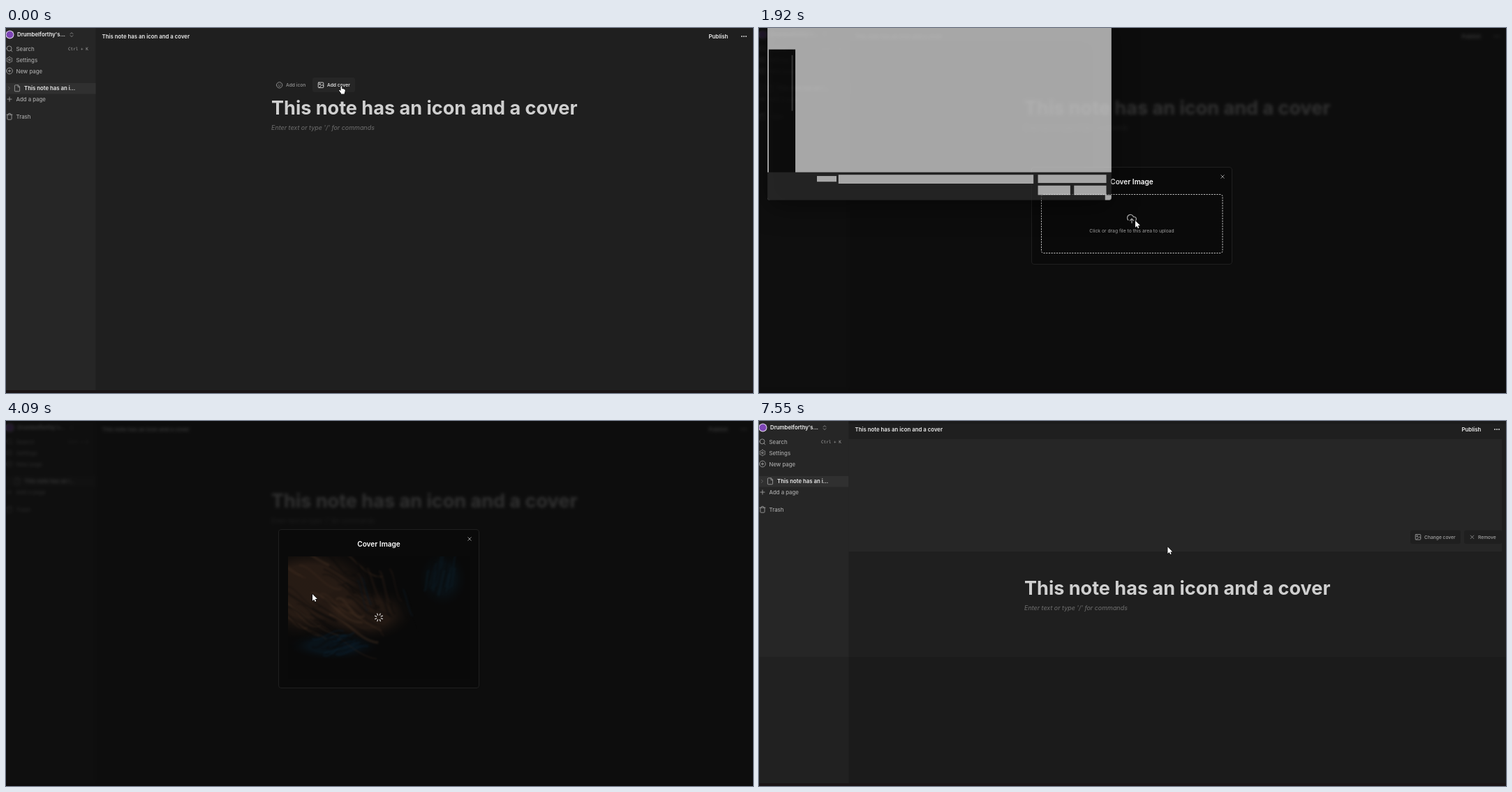
Animation, 1070 px wide and 523 px high, one loop 8 s. Source, as an HTML page with a canvas:

```html
<!DOCTYPE html>
<html lang="en">
<head>
<meta charset="utf-8">
<title>Note cover upload</title>
<style>
html, body { margin: 0; width: 100%; height: 100%; overflow: hidden; background: #1f1f1f; }
canvas { display: block; }
</style>
</head>
<body>
<canvas id="stage" width="1070" height="523"></canvas>
<script>
const W = 1070, H = 523, LOOP = 8000, PAD = 40;
const stage = document.getElementById('stage').getContext('2d');
let c = stage;

const UI = 'Inter, sans-serif', SYS = '"Open Sans", "Noto Sans", sans-serif';
const grey = v => `rgb(${v},${v},${v})`;
const clamp = v => Math.min(1, Math.max(0, v));
const span = (t, a, b) => clamp((t - a) / (b - a));
const easeOut = p => 1 - (1 - p) ** 2;
const smooth = p => p * p * (3 - 2 * p);

// ---------- drawing helpers ----------
function box(x, y, w, h, fill, r = 0, line) {
  c.beginPath();
  c.roundRect(x, y, w, h, r);
  if (fill) { c.fillStyle = fill; c.fill(); }
  if (line) { c.strokeStyle = line; c.lineWidth = 1; c.stroke(); }
}

function disc(x, y, r, fill) {
  c.beginPath();
  c.arc(x, y, r, 0, 7);
  c.fillStyle = fill;
  c.fill();
}

function text(s, x, y, font, fill, align = 'left') {
  c.font = font;
  c.fillStyle = fill;
  c.textAlign = align;
  c.fillText(s, x, y);
}

const sys = (s, x, y, align, fill = '#f2f2f2') => text(s, x, y, '6.5px ' + SYS, fill, align);

const ICONS = {
  search: 'M3 11a8 8 0 1 0 16 0a8 8 0 1 0-16 0M21 21l-4.3-4.3',
  plusRing: 'M2 12a10 10 0 1 0 20 0a10 10 0 1 0-20 0M8 12h8M12 8v8',
  plus: 'M5 12h14M12 5v14',
  updown: 'M7 15l5 5 5-5M7 9l5-5 5 5',
  right: 'M9 18l6-6-6-6',
  down: 'M6 9l6 6 6-6',
  file: 'M14.5 2H6a2 2 0 0 0-2 2v16a2 2 0 0 0 2 2h12a2 2 0 0 0 2-2V7.5zM14.5 2v6H20',
  trash: 'M3 6h18M19 6v14c0 1-1 2-2 2H7c-1 0-2-1-2-2V6M8 6V4c0-1 1-2 2-2h4c1 0 2 1 2 2v2',
  smile: 'M2 12a10 10 0 1 0 20 0a10 10 0 1 0-20 0M8 14s1.5 2 4 2 4-2 4-2M9 9h.1M15 9h.1',
  image: 'M5 3h14a2 2 0 0 1 2 2v14a2 2 0 0 1-2 2H5a2 2 0 0 1-2-2V5a2 2 0 0 1 2-2z' +
    'M7 9a2 2 0 1 0 4 0a2 2 0 1 0-4 0M21 15l-3.1-3.1a2 2 0 0 0-2.8 0L6 21',
  cross: 'M18 6L6 18M6 6l12 12',
  cloud: 'M4 14.9A7 7 0 1 1 15.7 8h1.8a4.5 4.5 0 0 1 2.5 8.2M12 12v9M16 16l-4-4-4 4',
  loader: 'M12 2v4M12 18v4M4.9 4.9l2.9 2.9M16.2 16.2l2.9 2.9M2 12h4M18 12h4M4.9 19.1l2.9-2.9M16.2 7.8l2.9-2.9',
  gear: gearPath()
};

function gearPath() {
  let d = 'M9 12a3 3 0 1 0 6 0a3 3 0 1 0-6 0';
  for (let i = 0; i <= 48; i++) {
    const a = i * Math.PI / 24, r = 8.7 + 1.2 * Math.cos(6 * a);
    d += (i ? 'L' : 'M') + (12 + r * Math.sin(a)).toFixed(2) + ' ' + (12 - r * Math.cos(a)).toFixed(2);
  }
  return d;
}

function icon(name, x, y, size, color, turn = 0) {
  c.save();
  c.translate(x, y);
  c.rotate(turn);
  c.scale(size / 24, size / 24);
  c.translate(-12, -12);
  c.strokeStyle = color;
  c.lineWidth = 2;
  c.lineCap = c.lineJoin = 'round';
  c.stroke(new Path2D(ICONS[name]));
  c.restore();
}

// Paints once into a padded bitmap and keeps it.
const cache = {};
function layer(key, paint) {
  if (!cache[key]) {
    const cv = document.createElement('canvas'), outer = c;
    cv.width = W + 2 * PAD;
    cv.height = H + 2 * PAD;
    c = cv.getContext('2d');
    c.translate(PAD, PAD);
    paint();
    c = outer;
    cache[key] = cv;
  }
  return cache[key];
}

function put(bitmap, alpha = 1, scale = 1, cx = 0, cy = 0) {
  c.save();
  c.globalAlpha = alpha;
  c.translate(cx, cy);
  c.scale(scale, scale);
  c.drawImage(bitmap, -PAD - cx, -PAD - cy);
  c.restore();
}

// ---------- note page ----------
const SMALL = '500 6.7px ' + UI, BODY = '500 7.8px ' + UI, STRONG = '600 7.8px ' + UI;
const NOTE = 'This note has an icon and a cover';

function sideRow(name, label, y, x = 14.5) {
  icon(name, 5, y, 10.5, grey(160));
  text(label, x, y + 3.2, BODY, grey(165));
}

function sidebar() {
  box(0, 0, 128.5, H, grey(38));
  disc(5.5, 9.5, 6, '#e6dcf0');
  disc(5.5, 9.5, 5, '#7d45b5');
  text("Drumbelforthy's...", 16, 12.4, STRONG, grey(240));
  icon('updown', 94, 9.6, 9, grey(165));
  sideRow('search', 'Search', 29.8);
  text('Ctrl + K', 89, 32, '6px "DejaVu Sans Mono", monospace', grey(165));
  sideRow('gear', 'Settings', 45.6);
  sideRow('plusRing', 'New page', 61.5);
  box(0, 79, 128.5, 15.5, grey(48));
  icon('right', 4.5, 86.3, 8, grey(120));
  icon('file', 16, 86.3, 10.8, grey(160));
  text('This note has an i...', 26, 89.2, STRONG, grey(235));
  sideRow('plus', 'Add a page', 102);
  sideRow('trash', 'Trash', 126.8);
}

function heading(dy) {
  text(NOTE, 380, 123.7 + dy, '700 27.05px ' + UI, grey(207));
  text("Enter text or type '/' for commands", 380, 145.8 + dy, 'italic 8.95px ' + UI, grey(112));
}

function addButtons() {
  icon('smile', 391.6, 81.8, 10, grey(160));
  text('Add icon', 401, 84.2, SMALL, grey(150));
  box(439, 71, 61, 21, grey(38), 3);
  icon('image', 451, 81.8, 10, grey(235));
  text('Add cover', 460, 84.2, SMALL, grey(245));
}

function cover() {
  box(128.5, 0, W, 4, grey(27));
  box(128.5, 26, 935.5, 161, grey(38));
  box(933, 156.5, 72, 19.5, grey(31), 3);
  icon('image', 944, 166.3, 10, grey(165));
  text('Change cover', 953, 168.7, SMALL, grey(165));
  box(1010, 156.5, 54, 19.5, grey(31), 3);
  icon('cross', 1021.5, 166.3, 9, grey(165));
  text('Remove', 1030, 168.7, SMALL, grey(165));
  box(0, 338, W, H - 338, 'rgba(0,0,0,.13)');
}

function page(kind) {
  return layer(kind, () => {
    box(0, 0, W, H, grey(31));
    sidebar();
    if (kind === 'hover') addButtons();
    if (kind === 'cover') cover();
    heading(kind === 'cover' ? 125 : 0);
    text(NOTE, 137.5, 14.8, STRONG, grey(235));
    text('Publish', 1006.5, 14.8, STRONG, grey(235));
    for (const x of [1054, 1057, 1060]) disc(x, 12, 0.9, grey(225));
    box(0, 519, W, 4, '#1b1516');
  });
}

const blurred = kind => layer(kind + '-blur', () => {
  c.filter = 'blur(1.9px)';
  c.drawImage(page(kind), -PAD, -PAD);
});

// ---------- cover artwork: soft strands in brown and blue ----------
function rng(seed) {
  return () => (seed = (seed * 16807) % 2147483647) / 2147483647;
}

function glow(x, y, rx, ry, color) {
  c.save();
  c.translate(x, y);
  c.scale(rx, ry);
  const g = c.createRadialGradient(0, 0, 0, 0, 0, 1);
  g.addColorStop(0, color);
  g.addColorStop(0.5, color);
  g.addColorStop(1, 'transparent');
  c.fillStyle = g;
  c.fillRect(-1, -1, 2, 2);
  c.restore();
}

function strands(n, x, y, w, h, dx, dy, colors, rand) {
  for (let i = 0; i < n; i++) {
    const px = x + rand() * w, py = y + rand() * h, k = 0.4 + rand() * 0.8, bend = (rand() - 0.5) * 26;
    c.beginPath();
    c.moveTo(px, py);
    c.bezierCurveTo(px + dx * k * 0.3, py + bend, px + dx * k * 0.6, py + dy * k - bend, px + dx * k, py + dy * k);
    c.strokeStyle = colors[i % colors.length];
    c.lineWidth = 1 + rand() * 3;
    c.stroke();
  }
}

const art = () => layer('art', () => {
  const rand = rng(77);
  c.beginPath();
  c.rect(0, 0, 260, 175);
  c.clip();
  box(0, 0, 260, 175, '#0a0a0a');
  glow(30, 50, 110, 76, 'rgba(140,88,58,.62)');
  glow(110, 82, 75, 42, 'rgba(140,88,58,.5)');
  glow(65, 128, 70, 22, 'rgba(12,62,98,.5)');
  glow(222, 32, 38, 44, 'rgba(14,56,84,.4)');
  c.filter = 'blur(.8px)';
  c.globalAlpha = 0.4;
  strands(40, -20, -10, 120, 110, 70, 40, ['#a8734e', '#0c0a0a', '#8a5a3e', '#0c0a0a'], rand);
  strands(18, 90, -10, 85, 70, 22, 55, ['#0a0a0a', '#5c3a28', '#0a0a0a', '#12324a'], rand);
  strands(18, -5, 116, 90, 26, 40, -10, ['#0c4470', '#0a0a0a', '#12517c', '#0a0a0a'], rand);
  strands(16, 195, -5, 50, 30, -10, 40, ['#0f3b59', '#0a0a0a', '#124460'], rand);
});

const drawArt = (x, y, w, h) => c.drawImage(art(), PAD, PAD, 260, 175, x, y, w, h);

// ---------- upload dialog ----------
function dialog(kind) {
  return layer(kind, () => {
    const full = kind === 'preview', top = full ? 155 : 199, h = full ? 228 : 140;
    box(390.5, top + 0.5, 287, h - 1, grey(10), 3.5, grey(31));
    text('Cover Image', 534, top + 25, '600 10.1px ' + UI, '#fff', 'center');
    icon('cross', 664, top + 14, 9, grey(190));
    if (full) {
      c.globalAlpha = 0.36;
      drawArt(404, 194, 260, 175);
      return;
    }
    c.setLineDash(kind === 'dropBold' ? [4.2, 2.3] : [2.2, 1.5]);
    c.beginPath();
    c.roundRect(404.5, 238.5, 259.5, 84, 3);
    c.strokeStyle = grey(195);
    c.lineWidth = kind === 'dropBold' ? 1.6 : 1;
    c.stroke();
    c.setLineDash([]);
    icon('cloud', 534, 273.3, 15.6, grey(160));
    text('Click or drag file to this area to upload', 534, 293, '6.75px ' + UI, grey(160), 'center');
  });
}

// ---------- file picker ----------
function folder(y) {
  box(16.5, y - 4, 5, 3, '#d99a1f', 1);
  box(16.5, y - 3, 9.5, 7, '#ffcf4f', 1);
}

function picture(y) {
  box(16.5, y - 4.5, 9, 9, '#1f87d6', 1);
  c.beginPath();
  c.moveTo(17, y + 4);
  c.lineTo(21, y - 0.5);
  c.lineTo(25, y + 4);
  c.fillStyle = '#e4f3ff';
  c.fill();
}

function navPane() {
  box(0, 26, 28.5, 17, grey(52));
  picture(34.5);
  box(4, 52, 20, 1, grey(62));
  box(33, 43.5, 1.3, 77, grey(150));
  box(39, 25, 1, 191, grey(44));
  box(16.5, 66.5, 9.5, 7.5, '#1fa3c4', 1);
  box(18, 71, 6.5, 1, '#b8ecf5');
  c.beginPath();
  c.moveTo(21.3, 84);
  c.lineTo(21.3, 91);
  c.moveTo(18, 88);
  c.lineTo(21.3, 91);
  c.lineTo(24.6, 88);
  c.moveTo(17.5, 93);
  c.lineTo(25, 93);
  c.strokeStyle = '#17b890';
  c.lineWidth = 1.2;
  c.stroke();
  box(17.5, 102, 7.5, 9, '#9fb4c8', 1);
  for (const y of [104, 106, 108]) box(19, y, 4.5, 0.8, '#4f6982');
  picture(124.5);
  disc(21.3, 142.5, 4.8, '#e2726c');
  disc(21, 143.5, 1.4, '#fff');
  folder(160.5);
  box(16.5, 174, 9.5, 9, '#8a42d6', 1);
  box(19.5, 177, 3.5, 3, '#efdcff');
  folder(196.5);
  folder(214);
}

function fileTiles(kind) {
  if (kind !== 'open') box(49, 29, 58, 65, grey(kind === 'picked' ? 104 : 55));
  drawArt(52, 48, 51, 34);
  box(112, 31, 49.5, 51, '#000');
  disc(136.3, 56.5, 19, '#fff');
  box(172.5, 31, 49, 51, '#000');
  disc(238.5, 73.5, 6.2, '#fff');
  box(291, 65.5, 50.5, 16.5, '#000');
  sys('bg-example.jpg', 78, 91, 'center');
  sys('noshan_logo.png', 138, 91, 'center');
  sys('noshan_logo_dar', 198, 91, 'center');
  sys('k.png', 198, 99.3, 'center');
  sys('noshan_logo_lon', 257.5, 91, 'center');
  sys('g.png', 257.5, 99.3, 'center');
  sys('noshan_logo_lon', 317.5, 91, 'center');
  sys('g_dark.png', 317.5, 99.3, 'center');
}

function toolbar() {
  box(-13, -30, 543, 38, grey(32));
  box(75.5, -12, 327, 13.5, null, 1, grey(70));
  box(409.5, -12, 113, 13.5, null, 1, grey(70));
  box(-13, 8, 543, 17, grey(30));
  sys('Organise', 8, 18.5);
  icon('down', 39.5, 16.5, 6.5, grey(220));
  sys('New folder', 59, 18.5);
  box(461.5, 12.5, 8, 7.5, null, 0.5, grey(230));
  box(463, 14, 5, 4, grey(230));
  icon('down', 477.5, 16.5, 6.5, grey(220));
  box(492.5, 12.5, 8, 7.5, null, 0.5, grey(230));
  box(497, 13, 3, 7, '#4cb5f0');
  disc(517, 16.3, 4.6, '#1683d8');
  text('?', 517, 18.7, '700 6.5px ' + SYS, '#fff', 'center');
}

function footer(kind) {
  box(-13, 216, 543, 44, grey(50), [0, 0, 4, 4]);
  sys('File name:', 101.5, 230.4, 'right');
  box(104.5, 221.5, 303, 13, grey(56), 0, grey(135));
  if (kind === 'picked') sys('bg-example.jpg', 106.5, 230.4);
  icon('down', 402.5, 228.3, 7, grey(210));
  box(414.5, 221.5, 105, 13, grey(56), 0, grey(135));
  sys('Image Files (*.xbm;*.tif;*.jfif;*.ic', 416.5, 230.4);
  icon('down', 515, 228.3, 7, grey(210));
  box(415.5, 238.5, 47.5, 13, grey(51), 2, grey(225));
  sys('Open', 439, 247.3, 'center');
  box(471.5, 238.5, 47.5, 13, grey(51), 2, grey(140));
  sys('Cancel', 495, 247.3, 'center');
  for (let i = 0; i < 3; i++)
    for (let j = 0; j <= i; j++) box(523.5 + 2 * i, 257.5 - 2 * j, 1, 1, grey(165));
}

// Unpainted window: controls still blank white.
function blank() {
  box(-13, -30, 543, 290, '#fff', 4);
  box(-11, 22, 42, 194, grey(14));
  box(25.5, 31, 1, 88, grey(150));
  box(-13, 216, 533, 44, grey(50), [0, 0, 0, 4]);
  box(519, 216, 11, 36, grey(50));
  box(65, 222, 31, 9, '#fff');
  box(99, 220, 308, 14, '#fff');
  box(414, 220, 108, 13, '#fff');
  box(414, 237, 51, 15, '#fff');
  box(471, 237, 51, 15, '#fff');
}

function picker(kind) {
  return layer('picker-' + kind, () => {
    if (kind === 'blank') return blank();
    box(-13, -30, 543, 290, grey(25), 4);
    toolbar();
    navPane();
    fileTiles(kind);
    footer(kind);
  });
}

// ---------- pointer ----------
const ARROW = new Path2D('M0 0V9.8L2.3 7.7L3.8 11L5.3 10.3L3.9 7.1H7Z');
const HAND = new Path2D('M-1 .8C-1-.3.7-.3.8.8V4C1.4 3.5 2.3 3.7 2.4 4.3C3 3.9 3.8 4.1 3.9 4.8' +
  'C4.6 4.5 5.2 4.9 5.2 5.6C5.2 8 5 8.6 4.3 9.8V11.2H-.6V10.2C-1.8 9-2.5 7.8-3.4 6.6C-3.9 5.8-2.9 5-2.2 5.7L-1 6.9Z');
const TRAIL = [
  [0, 480.5, 83.2], [60, 480.5, 83.2], [150, 476.6, 80.4], [1000, 476.6, 80.4], [1390, 539, 276],
  [2060, 539, 276], [2470, 300, 170], [2530, 295, 166], [2850, 84, 66], [3000, 84, 66],
  [3310, 385, 216], [3550, 435, 244.5], [3900, 435, 244.5], [4100, 439, 248],
  [5200, 439, 248], [5650, 585.4, 180.3]
];

function pointer(t) {
  let i = TRAIL.findIndex(k => k[0] > t);
  if (i < 0) i = TRAIL.length;
  const a = TRAIL[i - 1], b = TRAIL[i] || a;
  const p = a === b ? 0 : smooth(span(t, a[0], b[0]));
  const x = a[1] + (b[1] - a[1]) * p, y = a[2] + (b[2] - a[2]) * p;
  const hand = t < 500 || (t < 1690 && y > 239);
  c.save();
  c.translate(x, y);
  c.lineJoin = 'round';
  c.strokeStyle = '#000';
  c.lineWidth = 1.2;
  c.stroke(hand ? HAND : ARROW);
  c.fillStyle = '#fff';
  c.fill(hand ? HAND : ARROW);
  c.restore();
}

// ---------- timeline ----------
const OPEN = 460, CLICK = 1690, WIN_IN = 1860, PICK = 2910, WIN_OUT = 3820, LOADED = 3940, CLOSE = 7340;

function drawDialog(t, shown) {
  const preview = t >= LOADED;
  const kind = preview ? 'preview' : t < CLICK ? 'dropBold' : 'drop';
  put(dialog(kind), shown, 0.95 + 0.05 * shown, 534, 269);
  if (preview) {
    c.globalAlpha = shown;
    icon('loader', 534, 281.4, 14, grey(225), (t - 5030) / 1000 * 2 * Math.PI);
    c.globalAlpha = 1;
  }
}

function drawPicker(t) {
  if (t < WIN_IN || t > WIN_OUT + 160) return;
  const kind = t < 2090 ? 'blank' : t < 2760 ? 'open' : t < PICK ? 'hover' : 'picked';
  const enter = span(t, WIN_IN, WIN_IN + 190), leave = span(t, WIN_OUT, WIN_OUT + 160);
  const alpha = clamp(enter * 2) * (1 - leave);
  const scale = (0.87 + 0.13 * smooth(clamp(enter * 1.1))) * (1 - 0.09 * leave);
  c.save();
  c.shadowColor = 'rgba(0,0,0,.6)';
  c.shadowBlur = 36;
  c.shadowOffsetY = 10;
  put(picker(kind), alpha, scale, 258, 115);
  c.restore();
}

function render(t) {
  const shown = t < CLOSE ? easeOut(span(t, OPEN, OPEN + 200)) : 1 - easeOut(span(t, CLOSE, CLOSE + 200));
  const kind = t < 500 ? 'hover' : t < CLOSE ? 'plain' : 'cover';
  put(page(kind));
  if (shown > 0) {
    put(blurred(kind), shown);
    box(0, 0, W, H, `rgba(9,9,9,${0.8 * shown})`);
    drawDialog(t, shown);
  }
  drawPicker(t);
  pointer(t);
}

function tick() {
  render(performance.now() % LOOP);
  requestAnimationFrame(tick);
}
tick();
</script>
</body>
</html>
```
